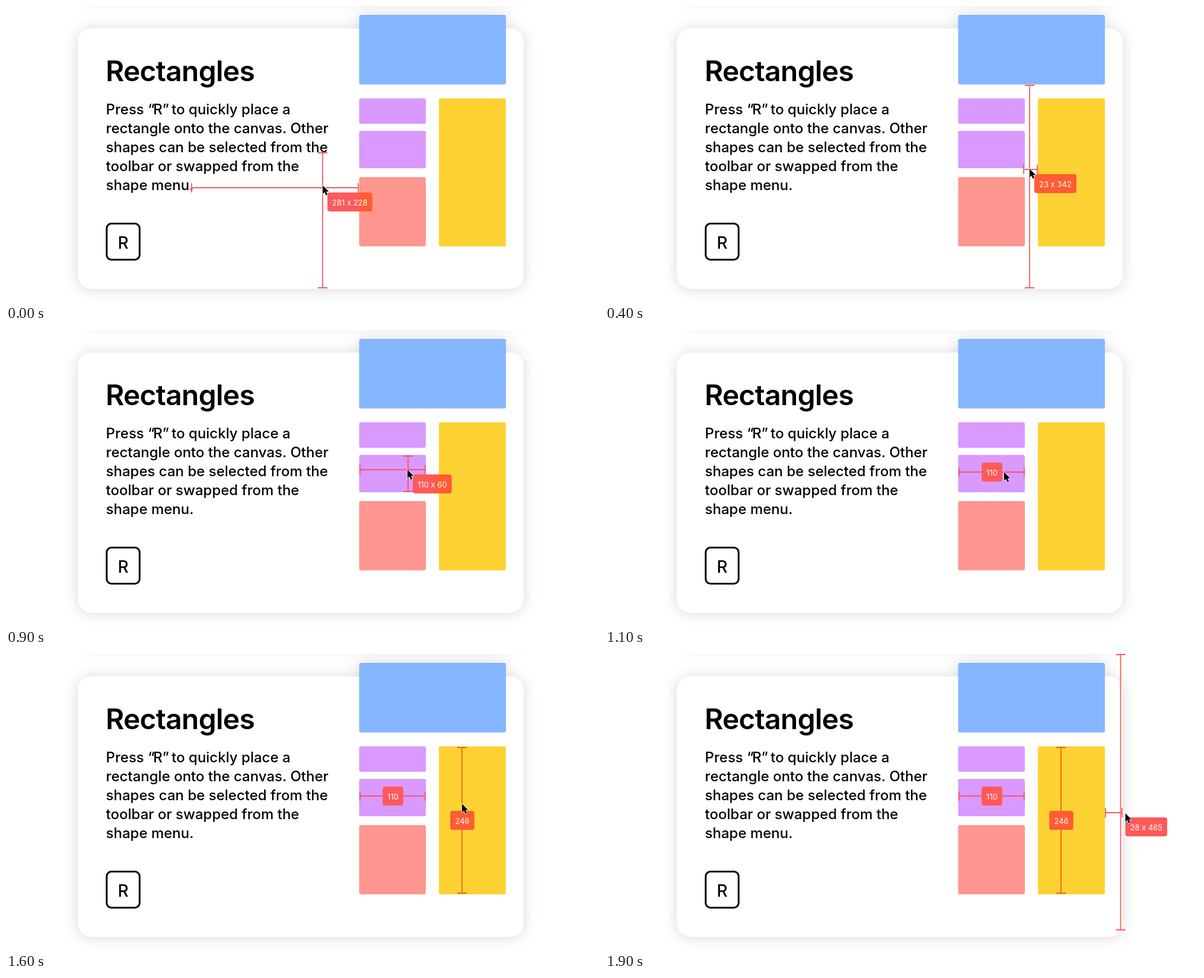
These frames come from a looping animation (1000 by 500 pixels, 2000 ms). An HTML page:

```html
<!DOCTYPE html>
<html lang="en">
<head>
<meta charset="utf-8">
<title>Rectangles</title>
<style>
  html, body { margin: 0; width: 100%; height: 100%; overflow: hidden; background: #fff; }
  svg { display: block; width: 100vw; height: 100vh; }
  text { font-family: Inter, sans-serif; }
  .title { font-size: 48px; font-weight: 600; letter-spacing: -.75px; }
  .body { font-size: 24px; font-weight: 500; }
  .quote { letter-spacing: -2.3px; }
  .key { font-size: 28px; font-weight: 500; text-anchor: middle; }
  .tag text { font-size: 13px; fill: #fff; }
</style>
</head>
<body>
<svg id="stage" viewBox="0 0 1000 500" preserveAspectRatio="none">
  <defs>
    <filter id="shadow" filterUnits="userSpaceOnUse" x="0" y="-120" width="1000" height="740">
      <feDropShadow dx="0" dy="1" stdDeviation="12" flood-color="#000" flood-opacity=".15"/>
    </filter>
    <clipPath id="warm">
      <rect x="595.5" y="289" width="112.5" height="117"/>
      <rect x="722" y="156" width="121" height="250"/>
    </clipPath>
  </defs>
  <rect width="1000" height="500" fill="#fff"/>
  <rect x="121" y="-110" width="752" height="98" rx="24" fill="#fff" filter="url(#shadow)"/>
  <g filter="url(#shadow)">
    <rect x="121" y="38" width="752" height="439.5" rx="24" fill="#fff"/>
    <rect x="595.5" y="15" width="247.5" height="117.5" rx="3" fill="#85b6ff"/>
  </g>
  <g id="boxes"></g>
  <text class="title" x="168" y="127">Rectangles</text>
  <g id="copy" class="body"></g>
  <rect x="169.8" y="367.5" width="55.5" height="61" rx="8" fill="none" stroke="#000" stroke-width="3"/>
  <text class="key" x="197.7" y="410">R</text>
  <g id="overlay"></g>
  <path id="cursor" d="M0 0V14.6L3.3 11.5L5.6 16.8L8.2 15.7L5.9 10.5H10.4Z"
        fill="#000" stroke="#fff" stroke-width="1.4" stroke-linejoin="round" paint-order="stroke"/>
</svg>
<script>
const NS = "http://www.w3.org/2000/svg";
const $ = id => document.getElementById(id);

function add(parent, tag, attrs, text) {
  const node = document.createElementNS(NS, tag);
  for (const k in attrs) node.setAttribute(k, attrs[k]);
  if (text) node.textContent = text;
  return parent.appendChild(node);
}

[
  [595.5, 156, 112.5, 43, "#d999ff"],
  [595.5, 211, 112.5, 63, "#d999ff"],
  [595.5, 289, 112.5, 117, "#ff968f"],
  [730, 156, 113, 250, "#ffd233"]
].forEach(([x, y, width, height, fill]) =>
  add($("boxes"), "rect", { x, y, width, height, rx: 3, fill }));

// Quotation marks are set tighter than the letters
[
  "Press “R” to quickly place a",
  "rectangle onto the canvas. Other",
  "shapes can be selected from the",
  "toolbar or swapped from the",
  "shape menu."
].forEach((line, i) => {
  const row = add($("copy"), "text", { x: 168.6, y: 183 + 32 * i });
  for (const part of line.split(/([“”])/))
    add(row, "tspan", /[“”]/.test(part) ? { class: "quote" } : {}, part);
});

// Measured extents: left, top, right, bottom, line colour
const RED = "#ff5a5a", ROSE = "#f06060", ORANGE = "#ff5c33", DARK = "#ee6318";
const zones = {
  text:   [313, 248, 594, 476, ROSE],
  side:   [313, 39, 594, 476, ROSE],
  pink:   [597, 291, 707, 404, RED],
  slot:   [706, 134, 729, 476, ROSE],
  gap:    [709, 134, 729, 476, ROSE],
  purple: [597, 213, 707, 273, "#f9546c"],
  yellow: [731.5, 158, 841.5, 404, DARK],
  edge:   [844, 1, 872, 466, RED]
};

// One pose per 100 ms: zone, crosshair x and y, cursor lead x and y
const STEP = 100;
const poses = [
  ["text", 534, 307, 0, -4],
  ["side", 572, 303, 6, -1],
  ["pink", 625, 298, 7, -1],
  ["pink", 676, 292, 5, -1],
  ["slot", 716, 276, 0, -1],
  ["gap", 721, 258, 0, -1],
  ["gap", 723, 240, 0, -1],
  ["gap", 723, 228, 0, -1],
  ["purple", 703, 232, -4, 0],
  ["purple", 678, 236, -1, 0],
  [null, 672, 240, 0, 0],
  [null, 673, 240, 0, 0],
  ["gap", 714, 243, 6, 0],
  ["yellow", 743, 246, 7, 0],
  ["yellow", 762, 250, 3, 1],
  [null, 769, 253, 0, 0],
  [null, 769, 253, 0, 0],
  ["yellow", 782, 257, 5, 0],
  ["yellow", 814, 264, 8, 0],
  ["edge", 869.5, 268, 8, 1]
];
const PIN_WIDTH = 10, PIN_HEIGHT = 15;

const layer = $("overlay");

function stroke(d, color) {
  add(layer, "path", { d, fill: "none", stroke: color, "stroke-width": 1.8 });
}

function across([l, , r, , color], y) {
  stroke(`M${l} ${y}H${r}M${l} ${y - 8}v16M${r} ${y - 8}v16`, color);
}

function down([, t, , b, color], x) {
  stroke(`M${x} ${t}V${b}M${x - 8} ${t}h16M${x - 8} ${b}h16`, color);
}

function tag(text, x, y, centered) {
  const g = add(layer, "g", { class: "tag" });
  const label = add(g, "text", { y: y + 22 }, text);
  const width = label.getComputedTextLength() + 16;
  if (centered) x -= width / 2;
  const box = { x, y, width, height: 32, rx: 4 };
  add(g, "rect", { ...box, fill: RED });
  add(g, "rect", { ...box, fill: ORANGE, "clip-path": "url(#warm)" });
  label.setAttribute("x", x + 8);
  g.appendChild(label);
}

function draw(i) {
  const [name, x, y, dx, dy] = poses[i];
  layer.replaceChildren();
  if (i >= PIN_WIDTH) {
    across(zones.purple, 240);
    tag("110", 652.5, 224, true);
  }
  if (i >= PIN_HEIGHT) {
    down(zones.yellow, 769);
    tag("246", 769.5, 265, true);
  }
  if (name) {
    const z = zones[name];
    across(z, y);
    down(z, x);
    tag(`${z[2] - z[0]} x ${z[3] - z[1]}`, x + 8, y + 8);
  }
  $("cursor").setAttribute("transform", `translate(${x + dx} ${y + dy})`);
}

let shown = -1;
const start = performance.now();
function tick(now) {
  const i = Math.floor(Math.max(0, now - start) / STEP) % poses.length;
  if (i !== shown) draw(shown = i);
  requestAnimationFrame(tick);
}
tick(start);
</script>
</body>
</html>
```
